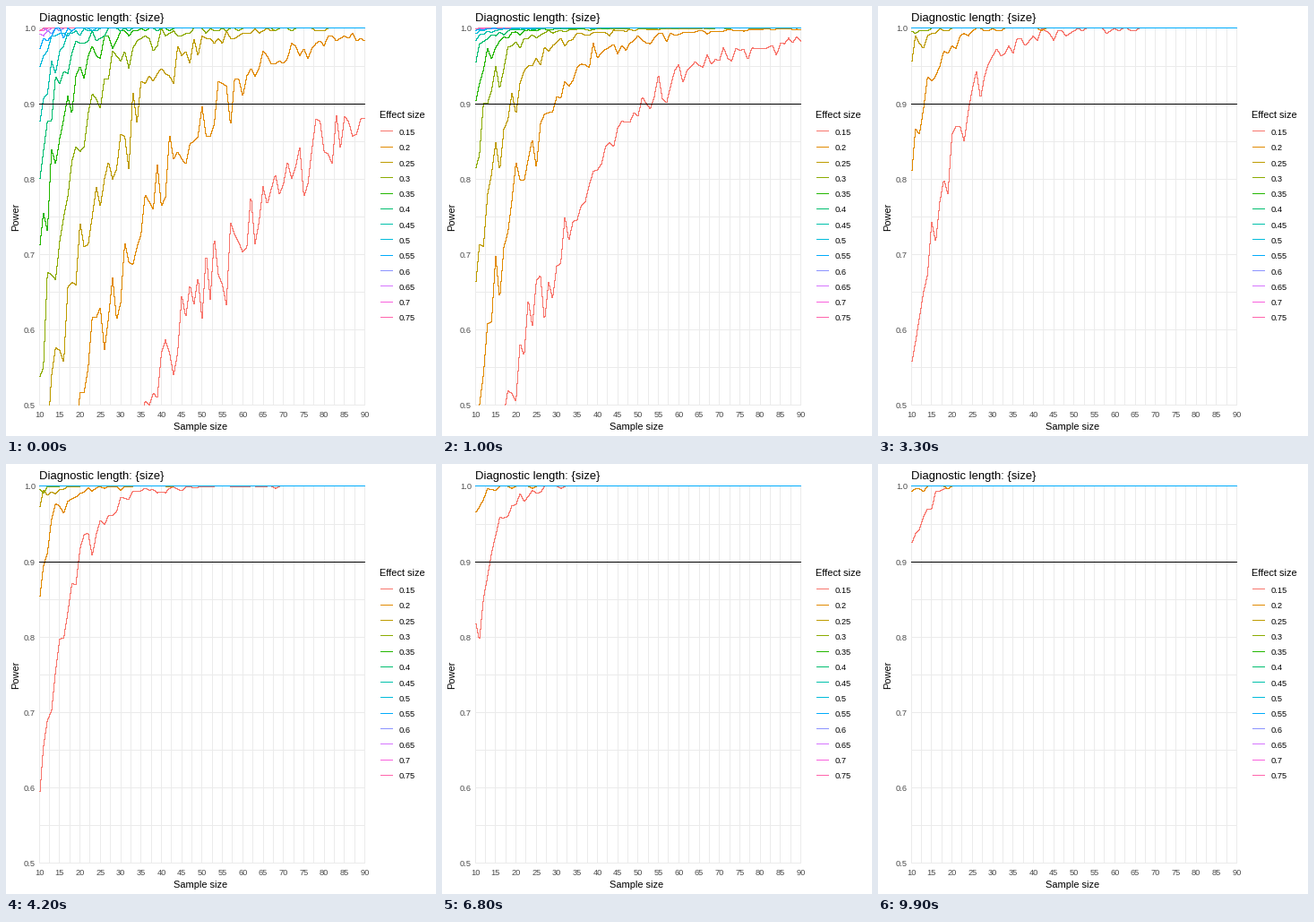
These frames come from a looping animation (480 px wide and 480 px high, 10 s). A matplotlib script:

```python
from math import erf, sqrt

import numpy as np
import matplotlib.pyplot as plt
from matplotlib.animation import FuncAnimation
from matplotlib.patches import Rectangle

plt.rcParams["font.family"] = "Liberation Sans"
plt.rcParams["path.simplify"] = False

SIZE, FRAMES, STEP, RUNS = 480, 100, 11, 300
GRID, GREY = "#EBEBEB", "#4D4D4D"
HUES = ["#F8766D", "#E18A00", "#BE9C00", "#8CAB00", "#24B700", "#00BE70",
        "#00C1AB", "#00BBDA", "#00ACFC", "#8B93FF", "#D575FE", "#F962DD",
        "#FF65AC"]
TOP = 8  # the 0.55 curve lies over the others
N = np.arange(10, 91)
EFFECTS = 0.15 + 0.05 * np.arange(len(HUES))
LENGTHS = range(10, 101, 10)

rng = np.random.default_rng(15)
normal_cdf = np.vectorize(lambda z: (1 + erf(z / sqrt(2))) / 2)


def simulate(length):
    """Share of simulated tests that find each effect, per sample size."""
    z = 0.715 * EFFECTS[:, None] * np.sqrt(N * length) - 2.03
    return rng.binomial(RUNS, normal_cdf(z)) / RUNS


STATES = [simulate(length) for length in LENGTHS]


def px(n):
    return 37.2 + (n - 10) * 4.542


def py(p):
    return 24.95 + (1 - p) * 842


def mid(v):
    """Centre of the pixel that holds v."""
    return np.floor(v) + 0.5


fig = plt.figure(figsize=(SIZE / 72, SIZE / 72), dpi=72, facecolor="white")
ax = fig.add_axes([0, 0, 1, 1])
ax.set(xlim=(0, SIZE), ylim=(SIZE, 0))
ax.axis("off")


def stroke(xs, ys, color, z, **kw):
    line, = ax.plot(xs, ys, color=color, lw=1, antialiased=False, snap=False,
                    solid_capstyle="butt", solid_joinstyle="miter",
                    zorder=z, **kw)
    return line


def label(x, y, text, size, color="black", **kw):
    ax.text(x, y, text, fontsize=size, color=color, **kw)


for n in np.arange(10, 90.1, 2.5):
    stroke([mid(px(n))] * 2, [24, 446], GRID, 1)
for p in np.arange(0.5, 1.01, 0.05):
    stroke([37, 401], [mid(py(p))] * 2, GRID, 1)
stroke([37, 401], [mid(py(0.9))] * 2, "black", 9)

for n in range(10, 91, 5):
    label(px(n), 459, str(n), 9.2, GREY, ha="center")
for p in np.arange(5, 11) / 10:
    label(33, mid(py(p)) + 3.5, f"{p:.1f}", 9.2, GREY, ha="right")

label(37, 17, "Diagnostic length: {size}", 13)
label(217.5, 473, "Sample size", 11, ha="center")
label(11.5, 235, "Power", 11, ha="center", va="center", rotation=90)
label(417, 125, "Effect size", 11)
for i, (hue, effect) in enumerate(zip(HUES, EFFECTS)):
    y = 139.99 + 17.28 * i
    stroke([418, 432], [mid(y)] * 2, hue, 2)
    label(439, round(y) + 4, f"{effect:.2f}".rstrip("0"), 9.2)

# One step per pixel column keeps the curves crisp and a single pixel wide
COLS = np.arange(37, 401) + 0.5
panel = Rectangle((37, 24), 364, 422, transform=ax.transData)
curves = []
for i, hue in enumerate(HUES):
    curve = stroke([], [], hue, 4 if i == TOP else 3, drawstyle="steps-post")
    curve.set_clip_path(panel)
    curves.append(curve)


def update(frame):
    k = min(frame // STEP, len(STATES) - 2)
    t = frame / STEP - k
    power = STATES[k] * (1 - t) + STATES[k + 1] * t
    for curve, p in zip(curves, power):
        curve.set_data(COLS, mid(np.interp(COLS + 0.5, px(N), py(p))))
    return curves


anim = FuncAnimation(fig, update, frames=FRAMES, interval=100, repeat=True)
plt.show()
```
